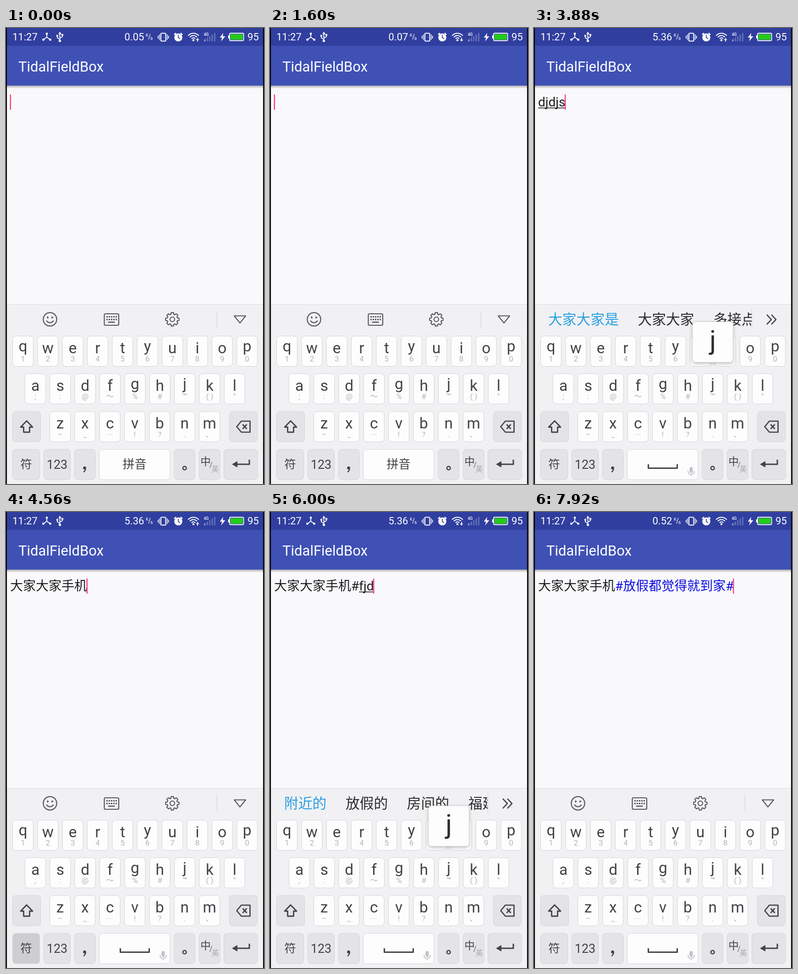
An HTML page with a canvas that plays this animation: 563 by 994 pixels, repeating every 8 s.

```html
<!DOCTYPE html>
<html lang="zh-CN">
<head>
<meta charset="utf-8">
<title>Topic input</title>
<style>
html, body { margin: 0; width: 100%; height: 100%; overflow: hidden; background: #000; }
canvas { display: block; width: 100vw; height: 100vh; }
</style>
</head>
<body>
<canvas id="stage" width="563" height="994"></canvas>
<script>
const ctx = document.getElementById('stage').getContext('2d');
const LOOP = 8000;
const FONT = 'Roboto, "Noto Sans CJK SC", "Noto Sans CJK", sans-serif';
const INK = '#434347', HINT = '#b6b6ba', WHITE = '#fff', PANEL = '#f1f1f3';

// Typed runs: key-down times, the phrase they become, and suggestions per length.
const RUNS = [
  {
    keys: 'djdjsj', at: [3320, 3440, 3560, 3680, 3760, 3840], done: 4200, phrase: '大家大家手机',
    words: ['的 都 到 地 大 点 多 当', '大家 点击 东京 等级 冬季', '大家的 打击的 等级的 东京的',
      '大家大家 等级大家 点击', '大家大家是 大家大家 多接点', '大家大家手机 大家大家 多接点']
  },
  {
    keys: 'fjdjdjdj', at: [5600, 5720, 5840, 5960, 6060, 6140, 6240, 6320], done: 6600, phrase: '放假都觉得就到家',
    words: ['发 放 非 分 飞 房 法 风', '附近 放假 房间 福建 飞机', '附近的 放假的 房间的 福建的',
      '放假大家 附近大家 房间', '放假都觉得 放假大家 附近', '放假都觉得就 放假大家',
      '放假都觉得就到 放假大家', '放假都觉得就到家 放假大家']
  }
];
const LIFT = 80, LINGER = 120;
const CURSOR_OFF = [[80, 560], [1120, 1600], [2120, 2600], [3080, 3400], [4760, 5280], [7080, 7680]];
const SYMBOLS_OPEN = [[4760, 5360], [7240, 7920]];
const SYMBOL_KEY_DOWN = [[4560, 4760], [7120, 7240]];
const HASH_DOWN = [[5280, 5360], [7840, 7920]];

const within = (spans, t) => spans.some(([a, b]) => t >= a && t < b);
// Value of the latest [time, value] step reached.
const step = (list, t) => list.filter(s => s[0] <= t).pop()[1];

function text(s, x, y, size, color = INK, align = 'center', weight = 400) {
  ctx.font = `${weight} ${size}px ${FONT}`;
  ctx.fillStyle = color;
  ctx.textAlign = align;
  ctx.fillText(s, x, y);
  return ctx.measureText(s).width;
}
function rect(x, y, w, h, color) {
  ctx.fillStyle = color;
  ctx.fillRect(x, y, w, h);
}
function line(d, color = INK, width = 2) {
  ctx.strokeStyle = color;
  ctx.lineWidth = width;
  ctx.stroke(new Path2D(d));
}
function shape(d, color = INK) {
  ctx.fillStyle = color;
  ctx.fill(new Path2D(d));
}
function round(x, y, w, h, r, fill, stroke, width = 1) {
  ctx.beginPath();
  ctx.roundRect(x, y, w, h, r);
  if (fill) { ctx.fillStyle = fill; ctx.fill(); }
  if (stroke) { ctx.strokeStyle = stroke; ctx.lineWidth = width; ctx.stroke(); }
}
function circle(x, y, r, fill, stroke, width = 2) {
  ctx.beginPath();
  ctx.arc(x, y, r, 0, Math.PI * 2);
  if (fill) { ctx.fillStyle = fill; ctx.fill(); }
  if (stroke) { ctx.strokeStyle = stroke; ctx.lineWidth = width; ctx.stroke(); }
}

function statusBar(t) {
  rect(2, 0, 559, 39, '#303f9f');
  text('11:27', 14, 27, 22, WHITE, 'left');

  // Three linked nodes
  line('M89 13V20L81 26M89 20L97 26', WHITE, 1.8);
  for (const [x, y] of [[89, 12.5], [81.5, 25.5], [96.5, 25.5]]) circle(x, y, 2.4, WHITE);

  // USB
  line('M117.5 12V28M117.5 25L112 21V17M117.5 22L123 19V15', WHITE, 1.8);
  shape('M117.5 8L121 13.5H114Z', WHITE);
  circle(117.5, 28, 2.6, WHITE);
  circle(112, 17, 2.2, WHITE);
  rect(121, 13, 4, 4, WHITE);

  text(step([[0, '0.05'], [560, '0.07'], [3560, '5.36'], [6560, '0.52']], t), 258.5, 27, 22, WHITE, 'left');
  text('K', 308, 19, 9.5, WHITE);
  line('M311 25L315 13', WHITE, 1.1);
  text('s', 317.5, 26, 11, WHITE);

  // Vibrate
  round(338, 11.5, 10.5, 17, 1.5, null, WHITE, 2);
  line('M334.8 14V26M331.8 17V23M351.7 14V26M354.7 17V23', WHITE, 1.6);

  // Alarm
  circle(376, 20.5, 8.8, WHITE);
  line('M367 14.5L371 11M385 14.5L381 11', WHITE, 2.4);
  line('M376 15V21L380 23.5', '#303f9f', 1.8);

  wifi(step([[0, 1], [1120, -1], [2120, 1], [5120, -1], [6120, 0]], t));

  text('4G', 437, 17, 8.5, WHITE, 'center', 500);
  for (let i = 0; i < 5; i++) {
    const h = 4 + i * 3.6;
    rect(432.5 + i * 5.4, 29 - h, 2.6, h, i ? '#6874bb' : '#a5addb');
  }
  shape('M474 11L466.5 21H471.5L469.5 29L478.5 18H473Z', WHITE);
  round(488, 11.5, 30.5, 16, 2, null, WHITE, 1.8);
  rect(490, 13.5, 26.5, 12, '#22cc16');
  rect(484.8, 16, 2.6, 7, WHITE);
  text('95', 527, 27, 22, WHITE, 'left');
}

function wifi(arrow) {
  for (const r of [5.5, 10.5, 15.5]) {
    ctx.beginPath();
    ctx.arc(409, 27, r, -Math.PI * 0.77, -Math.PI * 0.23);
    ctx.strokeStyle = WHITE;
    ctx.lineWidth = 2;
    ctx.stroke();
  }
  circle(409, 26.5, 2.3, WHITE);
  if (!arrow) return;
  rect(414, 21, 8, 9, '#303f9f');
  shape(arrow > 0 ? 'M418 22L421.5 26H419V29.5H417V26H414.5Z' : 'M418 29.5L421.5 25.5H419V22H417V25.5H414.5Z', WHITE);
}

function appBar() {
  const shade = ctx.createLinearGradient(0, 125, 0, 132);
  shade.addColorStop(0, 'rgba(0,0,0,.32)');
  shade.addColorStop(1, 'rgba(0,0,0,0)');
  rect(2, 125, 559, 7, shade);
  rect(2, 39, 559, 86.5, '#3f51b5');
  text('TidalFieldBox', 27, 94.5, 31, WHITE, 'left');
}

// What has been written, what is being composed, and the key held down.
function inputState(t) {
  const s = { parts: [], held: '', words: null };
  const [first, second] = RUNS;
  const closed = t >= 7880;
  const topic = closed ? '#0d0de0' : '#1d1d1f';
  if (t >= first.done) s.parts.push([first.phrase, '#1d1d1f']);
  if (t >= 5320) s.parts.push(['#', topic]);
  if (t >= second.done) s.parts.push([second.phrase, topic]);
  if (closed) s.parts.push(['#', topic]);

  for (const run of RUNS) {
    if (t < run.at[0] || t >= run.done) continue;
    const n = run.at.filter(a => t >= a + LIFT).length;
    if (n) {
      s.parts.push([run.keys.slice(0, n), '#1d1d1f', true]);
      s.words = run.words[n - 1].split(' ');
    }
    const down = run.at.filter(a => t >= a).length - 1;
    if (t < run.at[down] + LINGER) s.held = run.keys[down];
  }
  return s;
}

function editor(state, t) {
  let x = 9;
  for (const [s, color, underlined] of state.parts) {
    const w = text(s, x, 171, 28, color, 'left');
    if (underlined) rect(x, 173.5, w, 1.6, color);
    x += w;
  }
  if (!within(CURSOR_OFF, t)) rect(Math.max(8.5, x - 1.5), 145, 2.5, 33, '#ff4081');
}

function tools() {
  const c = '#55555a';
  circle(96, 635, 14.7, null, c, 2.2);
  circle(91, 631, 2, c);
  circle(101, 631, 2, c);
  line('M88 638Q96 647 104 638', c, 2.2);

  round(214.5, 623, 31.5, 25, 2.5, null, c, 2.2);
  for (let i = 0; i < 5; i++) {
    rect(219 + i * 5, 628, 3, 3, c);
    rect(219 + i * 5, 634, 3, 3, c);
  }
  rect(223, 640, 14.5, 2.5, c);

  let gear = '';
  for (let i = 0; i < 8; i++) {
    for (const [turn, r] of [[-0.3, 11.3], [-0.17, 14.8], [0.17, 14.8], [0.3, 11.3]]) {
      const a = i * Math.PI / 4 + turn;
      gear += (gear ? 'L' : 'M') + (363 + r * Math.cos(a)) + ' ' + (635 + r * Math.sin(a));
    }
  }
  line(gear + 'Z', c, 2.1);
  circle(363, 635, 5, null, c, 2.1);

  rect(459.5, 618, 1, 34, '#cfcfd3');
  line('M498 627.5H523L510.5 643Z', c, 2.1);
}

function suggestions(words) {
  ctx.save();
  ctx.beginPath();
  ctx.rect(2, 603, 473.5, 68);
  ctx.clip();
  let x = 31;
  words.forEach((w, i) => {
    x += text(w, x, 645.5, 30.8, i ? '#2b2b2e' : '#2a9fe2', 'left') + 41.5;
  });
  ctx.restore();
  rect(475, 612, 1, 46, '#cfcfd3');
  line('M508 625L518 635.5L508 646M518 625L528 635.5L518 646', '#4a4a4e', 2.6);
}

function key(x, y, w, fill = '#fdfdfe') {
  round(x + 0.5, y + 0.5, w - 1, 66, 7, fill, '#d3d3d9');
}
function letterRow(letters, hints, x, y) {
  [...letters].forEach((ch, i) => {
    const left = x + i * 54.35, mid = left + 23;
    key(left, y, 46);
    text(ch, mid, y + ('qpygj'.includes(ch) ? 34 : 37.5), 33.5);
    text(hints[i], mid, y + 56, 17, HINT);
  });
}
function backspace(dx, dy) {
  ctx.save();
  ctx.translate(dx, dy);
  line('M503.5 869L513.5 857H532.5V881H513.5ZM516.5 864L525.5 874M525.5 864L516.5 874', INK, 2.7);
  ctx.restore();
}

function letterBoard(t) {
  const gray = '#e4e4e8';
  letterRow('qwertyuiop', [...'1234567890'], 14, 671);
  letterRow('asdfghjkl', [';', ':', '@', '～', '%', '#', '“”', '( )', '‘’'], 41, 753);
  letterRow('zxcvbnm', ['–', '_', '···', '!', '?', '.', '、'], 95, 835.5);

  key(14, 835.5, 62, gray);
  line('M45 856.5L58 870H51.5V881H38.5V870H32Z', INK, 2.8);
  key(487, 835.5, 62, gray);
  backspace(0, 0);

  key(14, 918, 60, within(SYMBOL_KEY_DOWN, t) ? '#cdcdd2' : gray);
  text('符', 44, 960, 25.5);
  key(82, 918, 59, gray);
  text('123', 111.5, 961, 27);
  key(149, 918, 46.5, gray);
  circle(171.5, 959, 3.3, INK);
  line('M173.5 959Q174 965 169 968', INK, 2.4);
  key(203, 918, 155.5);
  if (t < 1640) {
    text('拼音', 280.5, 960, 26);
  } else {
    line('M249.5 951V959.5H312.5V951', INK, 3);
    round(339.5, 957, 7, 13, 3.5, '#c3c3c7');
    line('M336 965Q336 973 343 973Q350 973 350 965M343 973V977', '#c3c3c7', 1.8);
  }
  key(366.5, 918, 46.5, gray);
  circle(389.7, 959.5, 3.8, null, INK, 2.6);
  key(421, 918, 46.5, gray);
  text('中', 435.5, 953, 22.5);
  line('M444.5 959L449.5 946', '#77777c', 1.4);
  text('英', 456.5, 967, 15.5, '#a5a5aa');
  key(475, 918, 74.5, gray);
  line('M531 941V951H500', INK, 3);
  shape('M493 951L505 944V958Z');
}

function symbolBoard(t) {
  const cols = [95, 212, 328.5, 445, 561], rows = [671, 737, 802, 867.5, 933];
  const edge = '#dadad6', ink = '#3c3c40';
  const cells = [['#', '*', '@', '？'], ['+', '\'', '.', '~'], ['_', '-', '＊', '?'], ['：', '/', '!', '“']];
  rect(2, 671, 559, 262, '#f3f3f2');
  rect(2, 737, 93, 196, '#d9d9dc');
  if (within(HASH_DOWN, t)) rect(95, 671, 117, 66, '#cdcdcf');
  for (const y of rows) rect(y === 671 || y === 933 ? 2 : 95, y - 0.5, 559, 1, edge);
  for (const x of cols.slice(0, 4)) rect(x - 0.5, 671, 1, 262, edge);

  ['常用', '中文', '英文', '数学'].forEach((label, r) => {
    text(label, 48, rows[r] + 42.5, 24.5);
    cells[r].forEach((ch, c) => {
      text(ch, (cols[c] + cols[c + 1]) / 2, rows[r] + 44, 28, ink, 'center', ch > '\u3000' ? 400 : 500);
    });
  });

  rect(2, 933, 559, 61, '#e5e5e8');
  rect(2, 933, 559, 1, '#d2d2d4');
  text('返回', 57.5, 973, 25.5);
  round(267.5, 961.5, 28, 19.5, 2.5, null, INK, 2.5);
  line('M274.5 961V954.5A6.5 6.5 0 0 1 287.5 954V956', INK, 2.5);
  circle(281.5, 969.5, 1.9, INK);
  line('M281.5 970V975', INK, 2);
  backspace(-13, 95);
}

function popup(ch) {
  const mid = 64 + 'asdfghjkl'.indexOf(ch) * 54.35;
  ctx.save();
  ctx.shadowColor = 'rgba(0,0,0,.28)';
  ctx.shadowBlur = 7;
  ctx.shadowOffsetY = 2;
  round(mid - 44.5, 640, 89, 89, 7, '#fdfdfd');
  ctx.restore();
  round(mid - 44, 640.5, 88, 88, 7, null, '#d8d8dc');
  text(ch, mid, 700, 58, '#2b2b2e');
}

function draw(t) {
  const state = inputState(t);
  rect(0, 0, 563, 994, '#000');
  rect(2, 39, 559, 955, '#f9f9fb');
  statusBar(t);
  appBar();
  editor(state, t);

  rect(2, 602, 559, 392, PANEL);
  rect(2, 602, 559, 1, '#dcdcdf');
  if (state.words) suggestions(state.words); else tools();
  if (within(SYMBOLS_OPEN, t)) symbolBoard(t); else letterBoard(t);
  if (state.held) popup(state.held);
  rect(561, 0, 2, 994, '#000');
}

const start = performance.now();
function tick() {
  draw((performance.now() - start) % LOOP);
  requestAnimationFrame(tick);
}
ctx.lineJoin = 'round';
tick();
</script>
</body>
</html>
```
